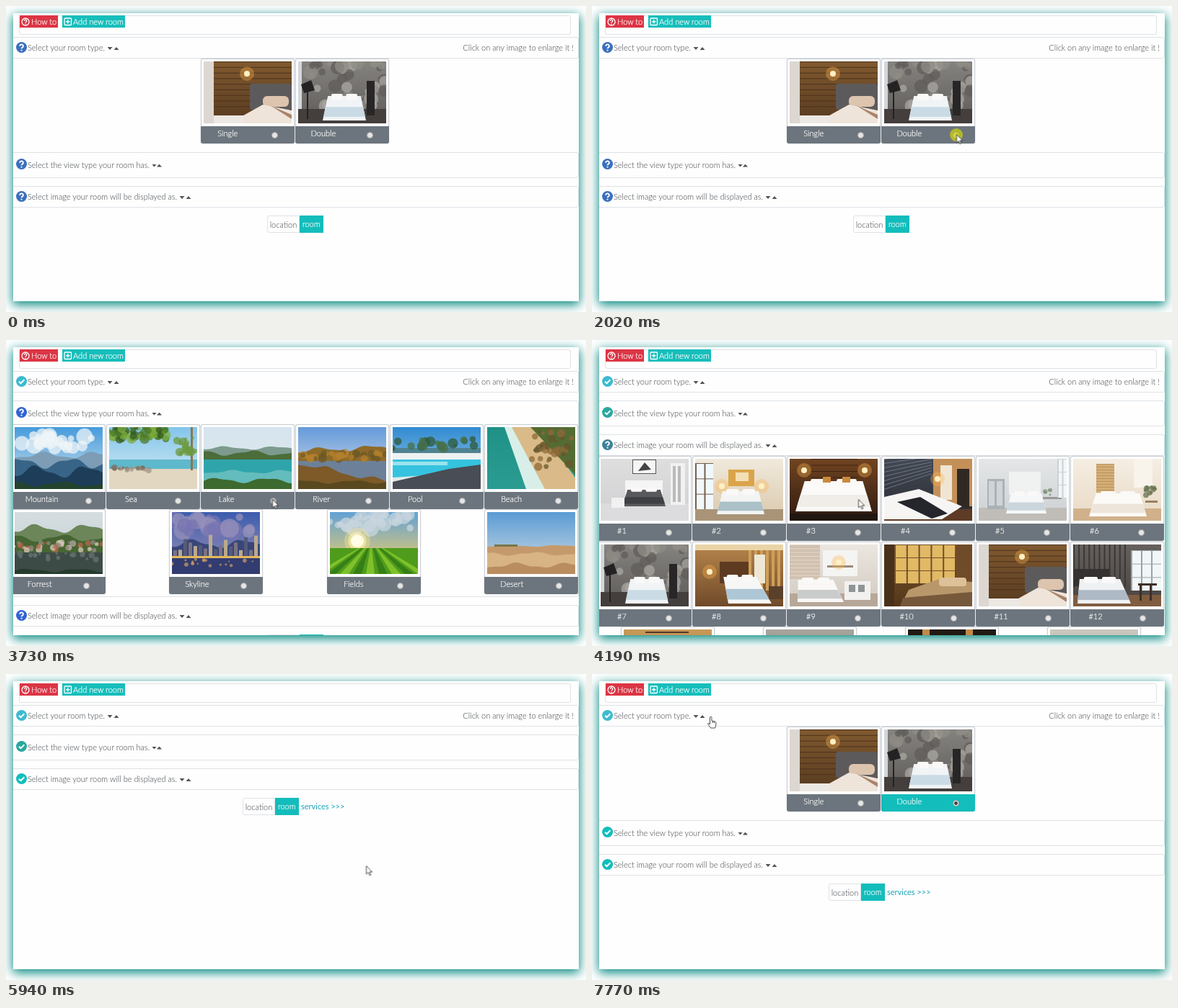
An HTML page that plays this animation: 804 by 425 pixels, repeating every 8 s.

```html
<!DOCTYPE html>
<html lang="en">
<head>
<meta charset="utf-8">
<title>Add a room</title>
<style>
html, body { margin: 0; width: 100%; height: 100%; overflow: hidden; background: #fff; }
body { position: relative; font: 300 11px/16px Lato, sans-serif; color: #3a3f44; white-space: nowrap; }
body div, body span, body b, body svg { position: absolute; box-sizing: border-box; }
.card, .glow { left: 10px; top: 10px; width: 784px; height: 400px; }
.card { overflow: hidden; background: #fefefe; }
.glow { box-shadow: 0 4px 14px 1px #0b8a82; }
.page { left: -10px; top: -10px; width: 804px; height: 425px; }
.scene { left: 0; top: 0; width: 804px; height: 425px; animation: 8s step-end infinite; }

.bar { left: 18px; top: 13px; width: 765px; height: 27px; border: 1px solid #dee2e6; border-radius: 3px; }
.btn, .room, .foot { color: #fff; -webkit-text-stroke: .2px #fff; }
.btn { top: 13px; height: 17px; }
.btn span { top: 1px; }
.btn svg { left: 2px; top: 3px; fill: none; stroke: #fff; stroke-width: 1.3; }
.section { left: 7px; width: 787px; border: 1px solid #dee2e6; border-radius: 3px; }
.hint { right: 17px; top: 50px; }
.caret { width: 7px; height: 4px; background: #50555a; clip-path: polygon(0 0, 100% 0, 50% 100%); }
.caret.up { clip-path: polygon(0 100%, 100% 100%, 50% 0); }

.thumb { width: 130px; height: 118px; border-radius: 3px; background: #fff; box-shadow: inset 0 0 0 1px #c9ced3, 0 0 1px #aab0b6; }
.thumb > svg { left: 4px; top: 4px; }
.thumb g { filter: blur(.5px); }
.foot { left: 0; bottom: 0; width: 130px; height: 24px; display: flex; justify-content: space-around; background: #6c757d; line-height: 20px; border-radius: 0 0 3px 3px; }
.foot span { position: static; }
.foot i { box-sizing: border-box; width: 9px; height: 9px; margin-top: 8px; border-radius: 50%; background: #e6e6e6; border: 1px solid #a3a3a3; }
.chosen .foot { background: #13bdbb; }
.chosen i { background: radial-gradient(circle, #444 0 2px, #e6e6e6 2.6px); }
.pressed i { animation: press 8s step-end infinite; }

.tabs { height: 24px; line-height: 23px; }
.tabs span { height: 24px; text-align: center; }
.location { left: 0; width: 45px; border: 1px solid #dee2e6; border-radius: 3px 0 0 3px; }
.room { left: 44.5px; width: 33.5px; background: #13bdbb; }
.services { left: 81px; color: #17a2b8; font-weight: 400; }

.spot { width: 18px; height: 18px; border-radius: 50%; background: rgba(200, 205, 20, .75); animation: 8s step-end infinite; }
#spot1 { left: 496px; top: 169.5px; animation-name: spot1; }
#spot2 { left: 490px; top: 257px; animation-name: spot2; }
.cursor { left: 0; top: 0; overflow: visible; fill: #fff; stroke: #222; stroke-width: .8; }
#arrow { animation: travel 8s infinite; }
#hand { left: 160px; top: 59px; animation: hand 8s step-end infinite; }

#types { animation-name: types; }
#views { animation-name: views; }
#images { animation-name: images; }
#done { animation-name: done; }
#review { animation-name: review; }
@keyframes types { 0% { visibility: visible } 27.125%, 100% { visibility: hidden } }
@keyframes views { 0% { visibility: hidden } 27.125% { visibility: visible } 52.375%, 100% { visibility: hidden } }
@keyframes images { 0% { visibility: hidden } 52.375% { visibility: visible } 74.25%, 100% { visibility: hidden } }
@keyframes done { 0% { visibility: hidden } 74.25% { visibility: visible } 97.125%, 100% { visibility: hidden } }
@keyframes review { 0% { visibility: hidden } 97.125%, 100% { visibility: visible } }
@keyframes press { 0% { background: #e6e6e6 } 46.625%, 100% { background: #b4b4b4 } }
@keyframes spot1 { 0% { transform: scale(0) } 23.125% { transform: scale(.65) } 25.25% { transform: none } 27.125%, 100% { transform: scale(0) } }
@keyframes spot2 { 0% { transform: scale(0) } 70% { transform: scale(.65) } 72% { transform: none } 74.25%, 100% { transform: scale(0) } }
@keyframes hand { 0% { opacity: 0 } 93.25%, 100% { opacity: 1 } }
@keyframes travel {
  0% { opacity: 0; transform: translate(648px, 320px); animation-timing-function: step-end }
  11.375% { opacity: 1; transform: translate(648px, 320px); animation-timing-function: steps(4, jump-end) }
  19.375% { opacity: 1; transform: translate(505.5px, 178.5px) }
  32.875% { opacity: 1; transform: translate(505.5px, 178.5px); animation-timing-function: steps(5, jump-both) }
  42.625% { opacity: 1; transform: translate(369.5px, 221.5px) }
  56.125% { opacity: 1; transform: translate(369.5px, 221.5px); animation-timing-function: steps(6, jump-both) }
  68.125% { opacity: 1; transform: translate(499.5px, 266.5px) }
  87.5% { opacity: 1; transform: translate(499.5px, 266.5px); animation-timing-function: steps(3, jump-both) }
  93.25% { opacity: 1; transform: translate(162px, 60px); animation-timing-function: step-start }
  93.26%, 100% { opacity: 0; transform: translate(162px, 60px) }
}
</style>
</head>
<body>
<div class="glow"></div>
<div class="card"><div class="page" id="page">
  <div class="bar"></div>
  <div class="btn" style="left:19px;width:53px;background:#dc3545">
    <svg width="12" height="12"><circle cx="6" cy="6" r="5"/><path d="M4.3 4.8a1.7 1.7 0 1 1 2.5 1.4Q6 6.6 6 7.3M6 8.3v1.2"/></svg>
    <span style="left:16px">How to</span>
  </div>
  <div class="btn" style="left:78px;width:87px;background:#17bebb">
    <svg width="12" height="12"><rect x="1" y="1" width="9.5" height="9.5" rx="1"/><path d="M5.75 3v5.5M3 5.75h5.5"/></svg>
    <span style="left:15px">Add new room</span>
  </div>
</div></div>
<div class="spot" id="spot1"></div>
<div class="spot" id="spot2"></div>
<svg class="cursor" id="arrow" width="10" height="15"><path d="M0 0V11.5L2.7 9 4.5 13.2 6.3 12.4 4.5 8.4H8.2Z"/></svg>
<svg class="cursor" id="hand" width="13" height="17"><path d="M3.5 1.5a1.2 1.2 0 0 1 2.4 0V6l4.7 1q1.2.4 1.2 1.8v3l-1.2 4.2H4.6L.8 10.7q-.4-1.5 1-1.3l1.7 1.4ZM7.5 6.500V9M9.500 7V9"/></svg>

<script>
const W = 122, H = 86;
const repeat = (count, draw) => Array.from({ length: count }, (_, i) => draw(i)).join("");
const randomFrom = seed => () => (seed = seed * 16807 % 2147483647) / 2147483647;

// Basic shapes
const box = (fill, x, y, w, h, rx = 0) => `<rect x="${x}" y="${y}" width="${w}" height="${h}" rx="${rx}" fill="${fill}"/>`;
const disc = (fill, x, y, r, alpha = 1) => `<circle cx="${x}" cy="${y}" r="${r}" fill="${fill}" opacity="${alpha}"/>`;
const poly = (fill, ...points) => `<polygon points="${points}" fill="${fill}"/>`;
const below = (fill, y) => box(fill, 0, y, W, H - y);

// Landscape parts
const ridge = (fill, y, amp, seed, slope = 0) => {
  const height = x => y + slope * x / W + amp * (Math.sin(x / 11 + seed) + Math.sin(x / 5 + seed * 3) / 3);
  const crest = Array.from({ length: 42 }, (_, i) => [i * 3, height(i * 3)]);
  return poly(fill, ...crest, [W + 2, H], [0, H]);
};
const scatter = (fills, seed, count, x, y, w, h, size) => {
  const rnd = randomFrom(seed);
  return repeat(count, i => disc(fills[i % fills.length], x + w * rnd(), y + h * rnd(), size * (.5 + rnd()), .75));
};
const towers = (fills, seed, base, tall) => {
  const rnd = randomFrom(seed);
  return repeat(17, i => {
    const h = tall * (.25 + rnd() * rnd());
    return box(fills[i % fills.length], i * 7 + 2, base - h, 5, h);
  });
};
const palms = seed => scatter(["#2f5a3a", "#47704a"], seed, 18, 0, 16, W, 14, 5);
const sun = (x, y, r) => disc("#ffe890", x, y, r * 2, .35) + disc("#fff0a8", x, y, r * 1.4, .6) + disc("#fffde6", x, y, r);

// Room parts
const bars = (fill, x, y, w, h, count, thick) => repeat(count, i => box(fill, x + i * w / count, y, thick, h));
const planks = (fill, x, y, w, h, count) => repeat(count, i => box(fill, x, y + i * h / count, w, 1));
const pane = (light, frame, x, y, w, h, cols) => box(light, x, y, w, h) + bars(frame, x, y, w, h, cols, 2) + planks(frame, x, y, w, h, 3);
const lamp = (x, y) => disc("#ffb54d", x, y, 10, .35) + disc("#fff0c3", x, y, 4);
const bed = (x, y, w, h, sheet, cover, skew = 0) => {
  const edge = t => [x + w * .12 * (1 - t) + skew * t, x + w * (.88 + .12 * t) + skew * t, y + h * t];
  const band = (fill, from, to) => {
    const [l, r, top] = edge(from), [l2, r2, foot] = edge(to);
    return poly(fill, l, top, r, top, r2, foot, l2, foot);
  };
  const pillows = [.2, .54].map(k => box("#faf9f7", x + w * k, y - 3, w * .26, h * .25, 2));
  return band(sheet, 0, 1) + band(cover, .45, .85) + pillows.join("");
};

// Each picture: top and bottom colour of the backdrop, then its parts
const single = ["#80592f", "#563a20", planks("#4c321c", 14, 0, 108, 70, 9), box("#dcd7d0", 0, 0, 14, H), lamp(60, 17),
  box("#5d5a5b", 64, 31, 58, 36, 3), box("#ddc4ae", 82, 48, 36, 15, 6), poly("#eee4da", 46, 80, 82, 60, W, 68, W, H, 46, H), poly("#a8846a", 92, 61, W, 74, W, 80), box("#ece8e3", 14, 75, 42, 11)];
const double = ["#858380", "#5d5a57", scatter(["#aaa7a2", "#605c59", "#8f8c86"], 12, 40, 0, 0, W, 62, 7), below("#443f3d", 66), box("#d3d7da", 0, 0, 5, 66),
  box("#282626", 95, 27, 11, 48), poly("#242222", 4, 32, 18, 26, 23, 40, 8, 44), box("#242222", 12, 36, 2, 44), bed(34, 48, 60, 34, "#f1f4f6", "#cadbe5")];

const photos = {
  Single: single,
  Double: double,
  Mountain: ["#459bdc", "#dbe8ef", scatter(["#eef4f7"], 5, 24, 10, 8, 105, 22, 8), ridge("#7d9db6", 39, 4, 1), ridge("#376487", 50, 6, 4), ridge("#1d3d59", 62, 7, 2), ridge("#24442f", 79, 3, 5)],
  Sea: ["#83c5ea", "#dceef4", below("#5db9cb", 45), below("#e2d7c0", 58), scatter(["#7d6c5c", "#a29284"], 8, 18, 4, 56, 55, 4, 3), box("#8d7450", 113, 0, 3, 60), scatter(["#4c7a28", "#7cab3e", "#365c20"], 3, 60, 0, 0, 82, 17, 5), scatter(["#6d9a42"], 9, 16, 94, 14, 28, 26, 4)],
  Lake: ["#d5e4ee", "#e2e9e9", ridge("#7d9a8e", 29, 2, 2), ridge("#4c6d3a", 36, 3, 5), below("#2fa5ab", 45), ridge("#64bcbc", 62, 2, 1), ridge("#3d6a2e", 74, 3, 3)],
  River: ["#649ada", "#e0e4ea", ridge("#8f6b2a", 33, 3, 2, -5), below("#6c8199", 47), ridge("#7d5a28", 50, 3, 1, 26), ridge("#5a491f", 76, 2, 4), scatter(["#b5812e", "#6d5926"], 4, 45, 0, 36, W, 8, 4)],
  Pool: ["#318bd2", "#a6cfe8", below("#4f8290", 29), palms(7), box("#edf1f2", 0, 36, W, 12), below("#35c3df", 45), box("#9be3ee", 0, 48, 76, 5), poly("#e2e9ea", 0, 70, W, 62, W, 68, 0, 76), poly("#494d55", 78, 58, W, 52, W, H, 0, H, 0, 76)],
  Beach: ["#1f9186", "#2a9c92", poly("#d8efe9", 24, 0, 38, 0, 82, H, 54, H), poly("#d9ba88", 34, 0, 70, 0, W, 70, W, H, 80, H), poly("#536c34", 60, 0, W, 0, W, 66), scatter(["#8d6a38", "#66552c"], 6, 35, 62, 5, 56, 50, 4)],
  Forrest: ["#d5dde1", "#c4ced0", ridge("#6c8659", 23, 5, 2), ridge("#466532", 36, 4, 5), scatter(["#d8cabb", "#b5674a", "#8d8b83"], 4, 45, 0, 42, W, 11, 3), below("#3d4b47", 56), scatter(["#66726f"], 8, 20, 0, 57, W, 9, 3), ridge("#253b2c", 81, 2, 3)],
  Skyline: ["#3c5cae", "#a295b5", scatter(["#7774b2", "#9590b9"], 9, 22, 0, 6, W, 24, 9), ridge("#384678", 44, 5, 2), towers(["#7a7383", "#bba98d", "#565b7a"], 11, 64, 44), box("#e3b95c", 0, 61, W, 3), below("#323c70", 64), scatter(["#c69768"], 5, 18, 0, 65, W, 10, 2)],
  Fields: ["#62a0d5", "#ffd55a", scatter(["#c8d5dd"], 4, 22, 0, 3, W, 20, 8), sun(38, 40, 9), below("#4f9c1c", 50), repeat(9, i => poly(i % 2 ? "#367f16" : "#7fc12a", 40 + i * 4, 50, 42 + i * 4, 50, i * 18 - 10, H, i * 18 - 22, H))],
  Desert: ["#5b9bd4", "#d4dfe4", ridge("#c49a6c", 47, 1, 2), ridge("#d8b384", 58, 2, 5), ridge("#b98d60", 74, 3, 1), box("#77784a", 10, 45, 32, 3)],
  "#1": ["#dededf", "#d0d0d2", below("#dcdcde", 62), box("#555", 44, 1, 33, 20), box("#f5f5f5", 45, 2, 31, 18), poly("#444", 52, 17, 61, 5, 70, 15), box("#f1f1f1", 97, 6, 20, 58), bars("#b9babc", 100, 10, 14, 50, 2, 4), box("#f5f5f5", 34, 30, 52, 20), bed(30, 43, 60, 23, "#58595d", "#3f4044"), box("#f1f1f1", 15, 54, 18, 14)],
  "#2": ["#f0e9dc", "#dac8ab", below("#a99478", 70), pane("#f1f8fb", "#745f49", 0, 6, 25, 64, 2), box("#dba44a", 46, 15, 36, 23), box("#f3dfb5", 56, 19, 18, 12), lamp(37, 38), lamp(92, 38), bed(30, 45, 66, 32, "#f3f5f4", "#abc0c7")],
  "#3": ["#714421", "#2e1a10", planks("#3e2413", 30, 0, 64, 34, 4), lamp(20, 16), lamp(104, 16), bed(8, 31, 106, 42, "#fbfaf8", "#f0ece7"), bars("#c88a3e", 46, 25, 54, 8, 2, 11), below("#211610", 76)],
  "#4": ["#434954", "#282b32", repeat(8, i => poly("#6f7680", 0, i * 6, 66, i * 4 - 8, 66, i * 4 - 7, 0, i * 6 + 1)), box("#c39059", 68, 0, 54, 66), box("#f0e5d2", 78, 9, 16, 48), box("#302923", 101, 14, 17, 54), below("#5d3b24", 70), lamp(74, 28), poly("#f6f5f3", 0, 53, 48, 42, 108, 66, 80, 84, 0, 84), poly("#25262c", 18, 60, 50, 53, 88, 76, 66, 83)],
  "#5": ["#e4e6e7", "#ccd0d3", below("#c0bdb9", 68), box("#aab2b6", 12, 28, 24, 42), bars("#ced4d7", 14, 31, 22, 34, 2, 8), box("#f0f1f1", 42, 18, 44, 32), bed(38, 48, 56, 28, "#f5f7f8", "#cbd5dc"), box("#9b9893", 89, 53, 26, 3), scatter(["#7f9478"], 2, 6, 92, 43, 8, 9, 3), pane("#f2f6f8", "#cbd0d2", 109, 0, 13, 54, 2)],
  "#6": ["#f5eee3", "#e8d9c4", below("#d0b18b", 69), box("#d2ae76", 32, 7, 25, 40), planks("#bc935c", 32, 7, 25, 40, 10), box("#f8f3eb", 84, 0, 26, 40), bed(22, 48, 80, 32, "#fcfaf6", "#eee5da"), scatter(["#66704d"], 3, 12, 100, 38, 15, 16, 3), box("#9a815f", 100, 58, 17, 3)],
  "#7": double,
  "#8": ["#b6854c", "#704a29", box("#ead4a7", 0, 0, W, 8), bars("#cf9f58", 74, 8, 48, 56, 6, 4), box("#eee7d4", 82, 14, 15, 40), box("#5e3a21", 34, 24, 40, 30), lamp(20, 38), bed(32, 45, 60, 37, "#f6f7f5", "#adc7d6", 14), box("#59402b", 102, 58, 20, 18)],
  "#9": ["#ebe6df", "#d1c9c0", box("#d1c1b0", 0, 0, 42, 48), planks("#e3d7ca", 0, 0, 42, 48, 9), below("#b7a798", 68), box("#f4f4f2", 46, 8, 48, 36), box("#9b8a78", 52, 29, 36, 3), lamp(68, 25), bed(4, 49, 64, 31, "#f9f8f6", "#c9cccb", 7), box("#f2f1ef", 76, 51, 36, 26), bars("#8f9496", 82, 56, 26, 10, 2, 9)],
  "#10": ["#7d552b", "#523719", pane("#e2b964", "#71502b", 14, 0, 84, 54, 5), box("#493019", 0, 0, 14, H), box("#704b2a", 100, 0, 22, 62), poly("#b8976b", 34, 63, 76, 48, W, 52, W, H, 22, H), box("#ddc199", 76, 46, 38, 12, 4), poly("#76583b", 26, 74, W, 66, W, H, 22, H)],
  "#11": single,
  "#12": ["#66605d", "#474341", bars("#3b3735", 0, 0, 78, 60, 11, 2), below("#805d40", 70), pane("#f1f6f8", "#9ba4a7", 80, 8, 42, 56, 3), box("#353130", 0, 34, 50, 24), bed(0, 48, 74, 34, "#eef1f3", "#aebac5", 6), box("#3e3027", 90, 54, 26, 3), bars("#3e3027", 92, 54, 28, 24, 2, 3)],
  "#13": ["#c99a58", "#8a5f32", box("#4b3a2a", 30, 3, 60, 2)],
  "#14": ["#a7a59e", "#77766f"],
  "#15": ["#211a13", "#15120f", bars("#c08a4a", 20, 0, 120, 20, 2, 10)],
  "#16": ["#cbc8c0", "#9d988d"]
};

const thumb = (name, x, y, state = "") => {
  const [top, bottom, ...parts] = photos[name];
  return `<div class="thumb ${state}" style="left:${x}px;top:${y}px">
    <svg width="${W}" height="${H}" style="background:linear-gradient(${top},${bottom})"><g>${parts.join("")}</g></svg>
    <div class="foot"><span>${name}</span><i></i></div></div>`;
};
const row = (names, y, x = 8, pitch = 131) =>
  names.map((name, i) => thumb(name, x + i * pitch, y, name === "Lake" ? "pressed" : "")).join("");
const numbered = (from, count) => Array.from({ length: count }, (_, i) => "#" + (from + i));

const marks = {
  ask: `<path d="M5.2 5.7a2.3 2.3 0 1 1 3.4 2Q7.5 8.3 7.5 9.3M7.5 10.7v1.7" stroke-width="1.9"/>`,
  ok: `<path d="M4 7.8l2.5 2.4 4.8-5" stroke-width="2"/>`
};

const section = (title, caret, gap, top, height, mid, [mark, color]) =>
  `<div class="section" style="top:${top}px;height:${height}px"></div>
  <svg width="15" height="15" style="left:13.5px;top:${mid - 7.5}px" fill="none" stroke="#fff"><circle cx="7.5" cy="7.5" r="7.5" fill="${color}" stroke="none"/>${marks[mark]}</svg>
  <span style="left:30px;top:${mid - 7}px">${title}</span>
  <b class="caret" style="left:${caret}px;top:${mid}px"></b>
  <b class="caret up" style="left:${caret + gap}px;top:${mid}px"></b>`;

const tabs = (x, y, services) =>
  `<div class="tabs" style="left:${x}px;top:${y}px"><span class="location">location</span><span class="room">room</span><span class="services">${services}</span></div>`;

// typesHeight and viewsHeight: how far the first and second sections are unfolded
const addScene = (id, icons, { typesHeight = 0, viewsHeight = 0, finished = false }, thumbs = "") => {
  const end = typesHeight + viewsHeight;
  const last = id === "images" ? "" : tabs(finished ? 328 : 362, 172 + end, finished ? "services &gt;&gt;&gt;" : "");
  document.getElementById("page").insertAdjacentHTML("beforeend", `<div class="scene" id="${id}">
    ${section("Select your room type.", 140.5, 9, 43, 30, 57, icons[0])}
    ${section("Select the view type your room has.", 202, 7, 84 + typesHeight, 36 + viewsHeight, 100.5 + typesHeight, icons[1])}
    ${section("Select image your room will be displayed as.", 240.5, 9, 131 + end, 30, 145 + end, icons[2])}
    <span class="hint">Click on any image to enlarge it !</span>${thumbs}${last}</div>`);
};

const asked = ["ask", "#3a6fbd"], waiting = ["ask", "#3163d4"], current = ["ask", "#3b8298"];
const cyan = ["ok", "#3cbbd0"], green = ["ok", "#27a89f"], teal = ["ok", "#13bdbd"];

addScene("types", [asked, asked, asked], { typesHeight: 119 }, row(["Single", "Double"], 73, 270));
addScene("views", [cyan, waiting, waiting], { viewsHeight: 237 },
  row(["Mountain", "Sea", "Lake", "River", "Pool", "Beach"], 117) +
  row(["Forrest", "Skyline", "Fields", "Desert"], 235, 8, 218.3));
addScene("images", [cyan, green, current], {},
  row(numbered(1, 6), 161) + row(numbered(7, 6), 280) + row(numbered(13, 4), 398, 40, 197));
addScene("done", [cyan, green, teal], { finished: true });
addScene("review", [cyan, teal, teal], { typesHeight: 119, finished: true },
  thumb("Single", 270, 73) + thumb("Double", 401, 73, "chosen"));
</script>
</body>
</html>
```
